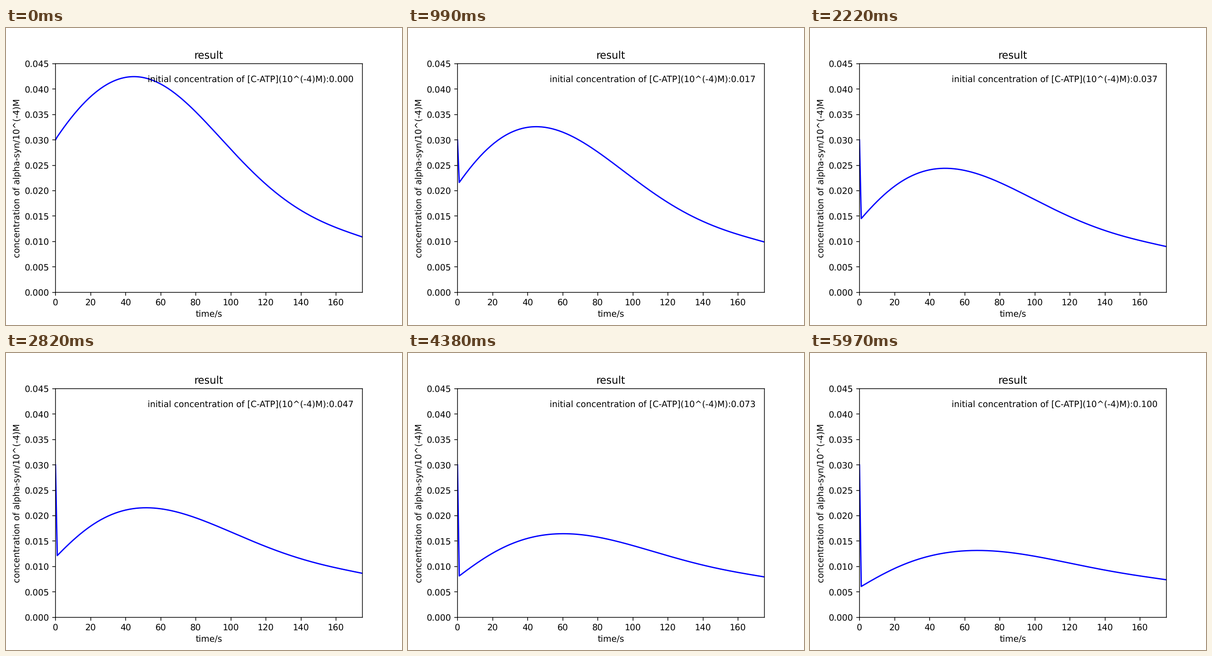
Recreate the animation shown at these times as a matplotlib script. Size 864 by 648 pixels, loop 6000 ms.

```python
import numpy as np
import matplotlib.pyplot as plt
from matplotlib.animation import FuncAnimation

FRAMES = 200
T_MAX, C_MAX = 175, 0.1

# Soft, unsnapped strokes and glyphs
plt.rcParams.update({"path.snap": False, "text.hinting": "none"})

# Key concentrations (1e-4 units): rows are doses, columns are times
key_t = np.array([1, 10, 40, 80, 120, 160, 175]) / T_MAX
key_c = np.array([0, 48, 114, 199]) / (FRAMES - 1)
keys = np.log([
    [306, 348, 423, 355, 212.6, 127.4, 108.9],
    [186, 224, 290, 250.5, 164.8, 109, 95.4],
    [103, 130, 186.4, 179.2, 131.4, 93.5, 83.6],
    [60.8, 78.6, 120.6, 129.6, 106.6, 81.4, 73.9],
])
t = np.arange(T_MAX + 1)


def lagrange(nodes, values, x):
    """Polynomial through the nodes, evaluated at x."""
    return np.polyval(np.polyfit(nodes, values, len(nodes) - 1), x)


def concentration(u):
    at_dose = [lagrange(key_c, column, u) for column in keys.T]
    y = 1e-4 * np.exp(lagrange(key_t, at_dose, t / T_MAX))
    y[0] = 0.03
    return y


fig, ax = plt.subplots(figsize=(6.4, 4.8), dpi=135)
ax.set(xlim=(0, T_MAX), ylim=(0, 0.045), title="result",
       xlabel="time/s", ylabel="concentration of alpha-syn/10^(-4)M")
line, = ax.plot([], [], color="blue", lw=1.5)
label = ax.text(0.3, 0.92, "", transform=ax.transAxes)


def update(i):
    u = i / (FRAMES - 1)
    line.set_data(t, concentration(u))
    label.set_text(f"initial concentration of [C-ATP](10^(-4)M):{C_MAX * u:.3f}")
    return line, label


anim = FuncAnimation(fig, update, frames=FRAMES, interval=30,
                     repeat=True, repeat_delay=0)
plt.show()
```
